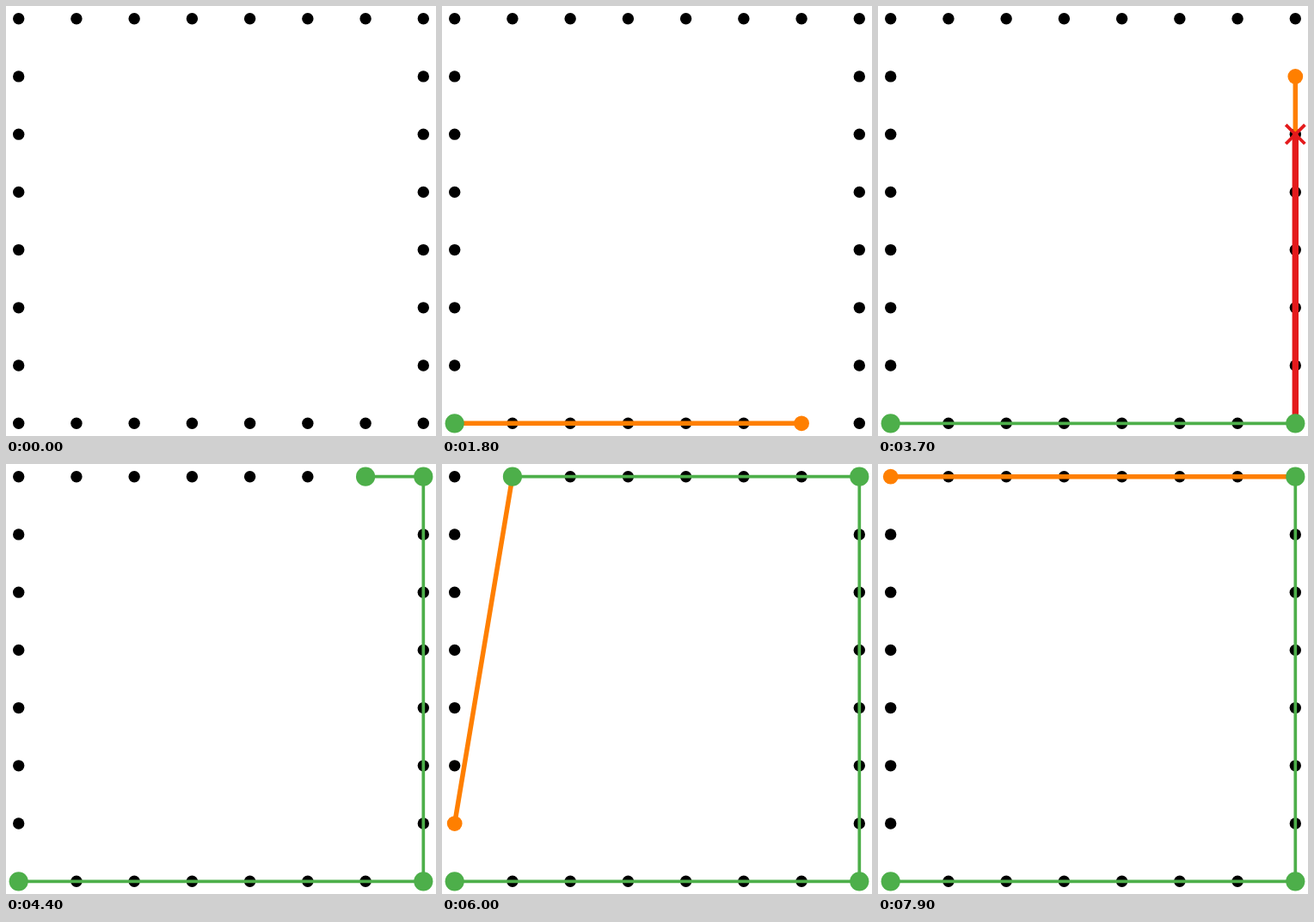
An HTML page with a canvas for the animation above (8000 ms loop, 500x500 px).

```html
<!DOCTYPE html>
<html>
<head>
<meta charset="utf-8">
<style>
  html, body { margin: 0; width: 500px; height: 500px; overflow: hidden; background: #fff; }
  canvas { display: block; }
</style>
</head>
<body>
<canvas id="stage" width="500" height="500"></canvas>
<script>
const ctx = document.getElementById('stage').getContext('2d');
const GREEN = '#4daf4a', RED = '#e41a1c', ORANGE = '#ff7f00';
const STEP = 100, COUNT = 80;

// Border of an 8 x 8 grid, sorted by angle around the lower left corner
const points = [];
for (let i = 0; i < 8; i++) points.push([i, 0]);
for (let i = 1; i < 8; i++) points.push([7, i]);
for (let i = 6; i > 0; i--) points.push([i, 7]);
for (let i = 1; i < 8; i++) points.push([0, i]);

const turn = (a, b, c) =>
  (b[0] - a[0]) * (c[1] - a[1]) - (b[1] - a[1]) * (c[0] - a[0]);

// Graham scan: each rejected, tried and accepted point gives one state
function scan() {
  const states = [{ hull: [] }];
  const hull = [];
  for (const next of points) {
    while (hull.length > 1 && turn(...hull.slice(-2), next) <= 0) {
      const popped = hull.pop();
      states.push({ hull: [...hull], popped, next });
    }
    states.push({ hull: [...hull], next });
    hull.push(next);
    states.push({ hull: [...hull] });
  }
  return states.slice(0, COUNT);
}

const place = ([x, y]) => [14.7 + x * 67.23, 485.3 - y * 67.23];

function line(path, color, width) {
  ctx.strokeStyle = color;
  ctx.lineWidth = width;
  ctx.beginPath();
  path.forEach(p => ctx.lineTo(...place(p)));
  ctx.stroke();
}

function dot(p, color, radius) {
  ctx.fillStyle = color;
  ctx.beginPath();
  ctx.arc(...place(p), radius, 0, 2 * Math.PI);
  ctx.fill();
}

function cross(p) {
  const [x, y] = place(p), r = 11.1;
  ctx.strokeStyle = RED;
  ctx.lineWidth = 3.8;
  ctx.beginPath();
  for (const s of [-1, 1]) {
    ctx.moveTo(x - r, y - s * r);
    ctx.lineTo(x + r, y + s * r);
  }
  ctx.stroke();
}

function draw({ hull, popped, next }) {
  ctx.fillStyle = '#fff';
  ctx.fillRect(0, 0, 500, 500);
  points.forEach(p => dot(p, '#000', 6.7));
  const top = hull[hull.length - 1];
  if (hull.length > 1) line(hull, GREEN, 3.7);
  if (next && top) line([popped || top, next], ORANGE, 5.5);
  if (popped) line([top, popped], RED, 7.4);
  hull.forEach(p => dot(p, GREEN, 11.1));
  if (next) dot(next, ORANGE, 8.9);
  if (popped) cross(popped);
}

const states = scan();
const start = performance.now();

function tick() {
  const time = Math.max(0, performance.now() - start);
  draw(states[Math.floor(time / STEP) % COUNT]);
  requestAnimationFrame(tick);
}
tick();
</script>
</body>
</html>
```
